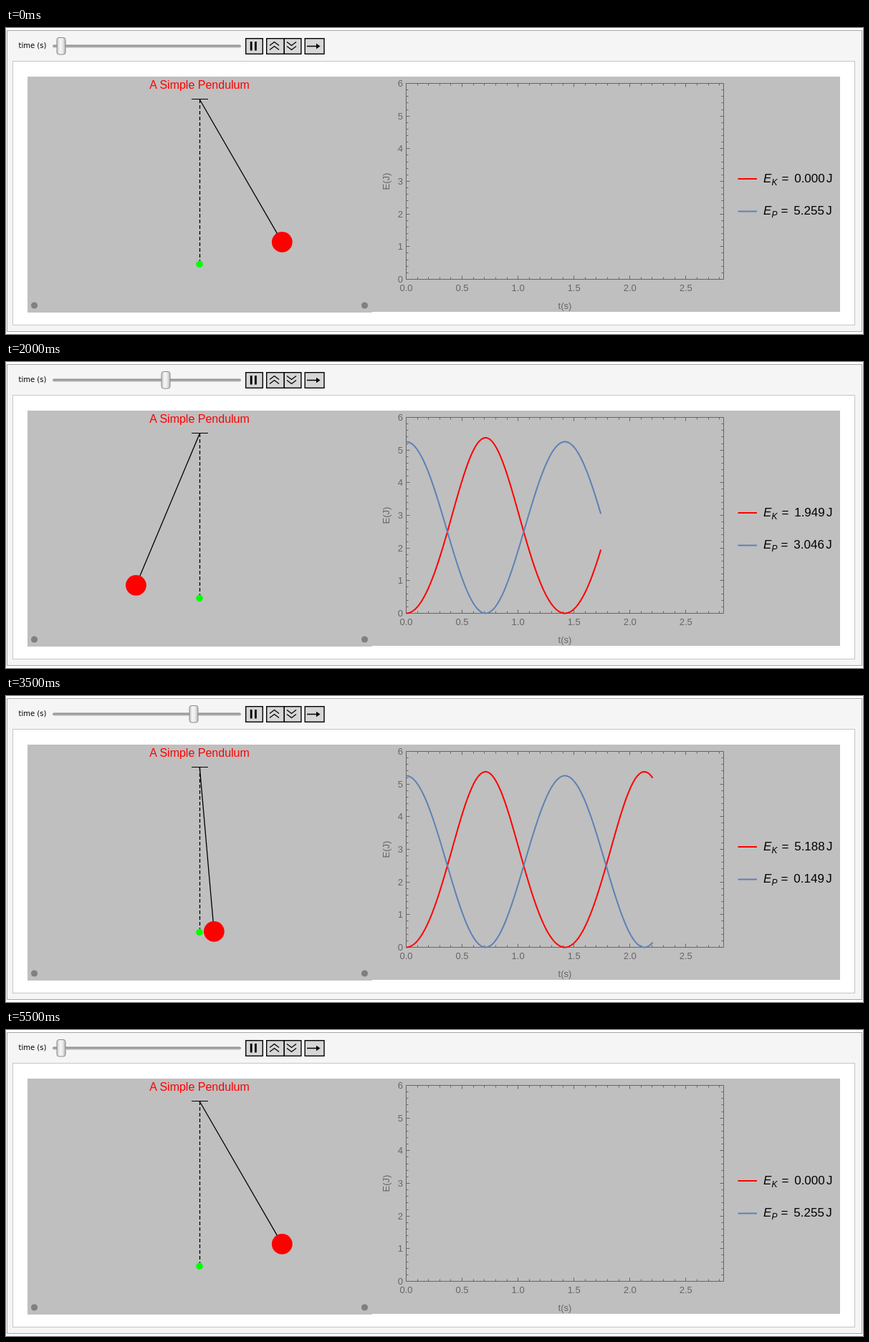
These frames come from a looping animation (1196x428 px, 6000 ms). An HTML page:

```html
<!DOCTYPE html>
<html lang="en">
<head>
<meta charset="utf-8">
<title>A Simple Pendulum</title>
<style>
  html, body { margin: 0; width: 100%; height: 100%; overflow: hidden; background: #fff; }
  svg { display: block; }
  text { font-family: "Liberation Sans", Arial, sans-serif; }
  .axis { font-size: 13px; fill: #666; }
  .mid { text-anchor: middle; }
  .end { text-anchor: end; }
  .legend { font-size: 17px; }
  .it { font-style: italic; }
  .sub { font-size: 12px; font-style: italic; }
  .ink { fill: none; stroke: #000; }
  .btn { fill: #d6d6d6; stroke: #000; stroke-width: 1.4; }
  .curve { fill: none; stroke-width: 2; stroke-linejoin: round; }
</style>
</head>
<body>
<svg width="1196" height="428" viewBox="0 0 1196 428">
  <defs>
    <linearGradient id="knob">
      <stop offset="0" stop-color="#c4c4c4"/>
      <stop offset=".35" stop-color="#f6f6f6"/>
      <stop offset=".65" stop-color="#ececec"/>
      <stop offset="1" stop-color="#b4b4b4"/>
    </linearGradient>
    <linearGradient id="groove" x2="0" y2="1">
      <stop offset="0" stop-color="#8c8c8c"/>
      <stop offset="1" stop-color="#b8b8b8"/>
    </linearGradient>
  </defs>

  <rect x="1.5" y="3.5" width="1193" height="421" fill="#f5f5f5" stroke="#a6a6a6"/>
  <rect x="9.5" y="46.5" width="1175" height="369" fill="#fff" stroke="#c6c6c6"/>
  <path d="M30 68H1164V397H511V398H30Z" fill="#bfbfbf"/>

  <!-- controls -->
  <text x="17.6" y="28" style="font:10px 'DejaVu Sans',sans-serif">time (s)</text>
  <rect x="65" y="23.5" width="263" height="4" rx="2" fill="url(#groove)"/>
  <g id="thumb">
    <rect x="71" y="13.5" width="12" height="23.5" rx="3" fill="url(#knob)" stroke="#8a8a8a"/>
  </g>
  <rect class="btn" x="334.7" y="14.7" width="23.6" height="21.6"/>
  <path d="M340.8 19h2.8v12.5h-2.8zM347 19h2.8v12.5H347z"/>
  <rect class="btn" x="363.7" y="14.7" width="24.6" height="21.6"/>
  <rect class="btn" x="388.3" y="14.7" width="23.6" height="21.6"/>
  <path class="ink" stroke-width="1.3" d="M368 24.5l6.5-5 6.5 5M368 30.5l6.5-5 6.5 5M392 19.5l6.5 5 6.5-5M392 25.5l6.5 5 6.5-5"/>
  <rect class="btn" x="417.2" y="14.7" width="26.8" height="21.6"/>
  <path class="ink" stroke-width="1.5" d="M420 25.5H435"/>
  <path d="M433 21.8L438.5 25.5L433 29.2Z"/>

  <!-- pendulum -->
  <text class="mid" x="270" y="85" font-size="16" fill="#f00">A Simple Pendulum</text>
  <circle cx="39.5" cy="388" r="4.6" fill="#808080"/>
  <circle cx="500.5" cy="388" r="4.6" fill="#808080"/>
  <path class="ink" d="M259 99.5H282"/>
  <path class="ink" stroke-width="1.3" stroke-dasharray="5 3" d="M270.5 100V330"/>
  <line id="rod" class="ink" stroke-width="1.3" x1="270.3" y1="100"/>
  <circle cx="270" cy="330.4" r="4.8" fill="#0f0"/>
  <circle id="bob" r="14.4" fill="#f00"/>

  <!-- energy plot -->
  <path id="ticks" fill="none" stroke="#666"/>
  <g id="labels" class="axis"></g>
  <text class="axis mid" x="780" y="393">t(s)</text>
  <text class="axis mid" transform="translate(535.3 214.5) rotate(-90)">E(J)</text>
  <path id="kinCurve" class="curve" stroke="#f00"/>
  <path id="potCurve" class="curve" stroke="#5e81b5"/>

  <!-- legend -->
  <path d="M1021.5 211H1048" stroke="#f00" stroke-width="2"/>
  <path d="M1021.5 256.5H1048" stroke="#5e81b5" stroke-width="2"/>
  <g class="legend">
    <text class="it" x="1057" y="216">E</text>
    <text class="sub" x="1068.6" y="219.5">K</text>
    <text x="1082.5" y="216">=</text>
    <text id="kin" x="1100.2" y="216"></text>
    <text x="1145" y="216">J</text>
    <text class="it" x="1057" y="261">E</text>
    <text class="sub" x="1068.6" y="264.5">P</text>
    <text x="1081.5" y="261">=</text>
    <text id="pot" x="1099.3" y="261"></text>
    <text x="1144.2" y="261">J</text>
  </g>
</svg>
<script>
const $ = id => document.getElementById(id);
const set = (id, attrs) => {
  for (const k in attrs) $(id).setAttribute(k, attrs[k]);
};

// physics: harmonic swing, kinetic energy from the horizontal speed
const g = 9.80665, mass = 2, len = 2, amp = Math.PI / 6;
const omega = Math.sqrt(g / len);
const period = 2 * Math.PI / omega;
const angle = t => amp * Math.cos(omega * t);
const potential = t => mass * g * len * (1 - Math.cos(angle(t)));
const kinetic = t => {
  const v = len * amp * omega * Math.sin(omega * t) * Math.cos(angle(t));
  return mass * v * v / 2;
};

// plot geometry
const left = 558.5, right = 1001.5, top_ = 77.5, base = 351.5;
const px = t => left + t * (right - left) / period;
const py = e => base - e * (base - top_) / 6;

function drawAxes() {
  let d = `M${left} ${top_}H${right}V${base}H${left}Z`;
  let labels = "";
  const snap = v => Math.floor(v) + 0.5;
  for (let i = 0; i <= 28; i++) {
    const x = snap(px(i / 10)), n = i % 5 ? 3 : 5;
    d += `M${x} ${base}v${-n}M${x} ${top_}v${n}`;
    if (i % 5 === 0)
      labels += `<text class="mid" x="${px(i / 10)}" y="368">${(i / 10).toFixed(1)}</text>`;
  }
  for (let i = 0; i <= 30; i++) {
    const y = snap(py(i / 5)), n = i % 5 ? 3 : 5;
    d += `M${left} ${y}h${n}M${right} ${y}h${-n}`;
    if (i % 5 === 0)
      labels += `<text class="end" x="554" y="${y + 4.5}">${i / 5}</text>`;
  }
  set("ticks", { d });
  $("labels").innerHTML = labels;
}

function curve(f, end) {
  if (!end) return "";
  const n = Math.max(2, Math.ceil(end / 0.015));
  let d = "";
  for (let i = 0; i <= n; i++) {
    const t = end * i / n;
    d += (i ? "L" : "M") + px(t).toFixed(2) + " " + py(f(t)).toFixed(2);
  }
  return d;
}

// slider time: there and back in equal steps, resting at both ends of the loop
const lastStep = 51, stride = 0.11542, lead = 0.0086, roundTrip = 5.67487;
function stepAt(ms) {
  return ms < 500 ? 0 : Math.min(lastStep, Math.floor((ms - 500) / 100) + 1);
}
function timeAt(step) {
  if (step === 0 || step === lastStep) return 0;
  const p = lead + stride * (step - 1);
  return Math.min(p, roundTrip - p);
}

function draw(t) {
  const a = angle(t);
  const x = 270.3 + 230 * Math.sin(a), y = 100.2 + 230 * Math.cos(a);
  set("thumb", { transform: `translate(${Math.floor(t * 84.3)} 0)` });
  set("rod", { x2: x, y2: y });
  set("bob", { cx: x, cy: y });
  set("kinCurve", { d: curve(kinetic, t) });
  set("potCurve", { d: curve(potential, t) });
  $("kin").textContent = kinetic(t).toFixed(3);
  $("pot").textContent = potential(t).toFixed(3);
}

drawAxes();
const start = performance.now();
let shown = -1;
function tick() {
  const step = stepAt((performance.now() - start) % 6000);
  if (step !== shown) draw(timeAt(shown = step));
  requestAnimationFrame(tick);
}
tick();
</script>
</body>
</html>
```
